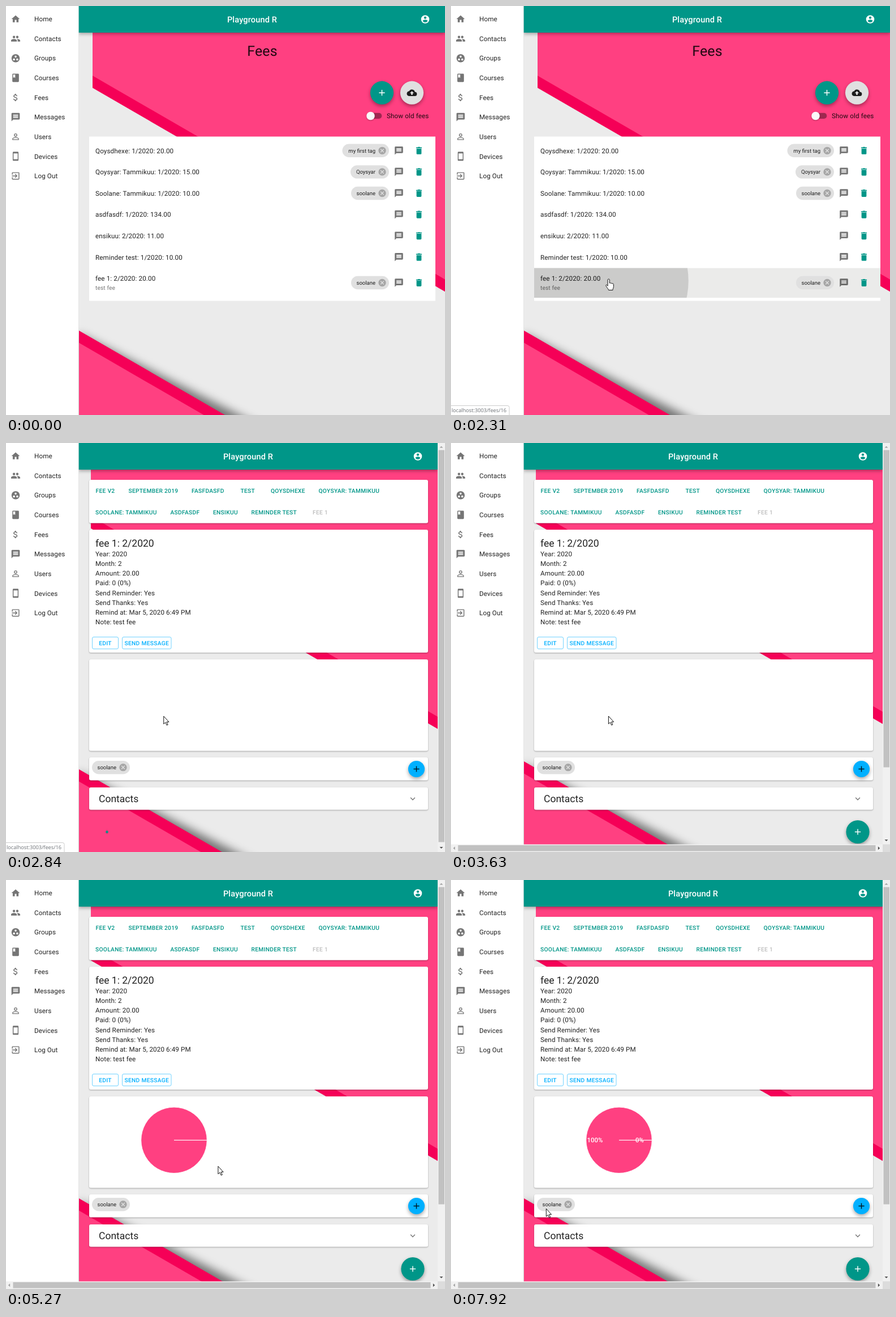
These frames come from a looping animation (776x722 px, 7.99 s). An HTML page:

```html
<!DOCTYPE html>
<html lang="en">
<head>
<meta charset="utf-8">
<title>Fees</title>
<style>
html, body { margin: 0; width: 100%; height: 100%; overflow: hidden; background: #ebebeb; }
svg { display: block; width: 100vw; height: 100vh; }
text { font-family: Roboto, "Liberation Sans", sans-serif; white-space: pre; text-rendering: geometricPrecision; }
.card { filter: drop-shadow(0 1px 1px rgba(0,0,0,.3)); }
.bar { filter: drop-shadow(0 2px 3px rgba(0,0,0,.35)); }
.fab { filter: drop-shadow(0 3px 3px rgba(0,0,0,.35)); }
.shade { filter: blur(8px); }
</style>
</head>
<body>
<svg id="stage" viewBox="0 0 776 722" xmlns="http://www.w3.org/2000/svg"></svg>
<script>
const TEAL = '#009688', PINK = '#ff4081', DEEP = '#f50057', BLUE = '#00b0ff';
const INK = 'rgba(0,0,0,.87)', GREY = 'rgba(0,0,0,.54)', DIM = 'rgba(0,0,0,.26)';
const BODY = 11.68, SMALL = 10.22, HEAD = 17.52;
const LOOP = 7990, SLOPE = Math.tan(Math.PI / 6);

// Icons on a 24 unit grid
const ICONS = {
  home: 'M10 20v-6h4v6h5v-8h3L12 3 2 12h3v8z',
  people: 'M13 8a3 3 0 1 0 6 0a3 3 0 1 0-6 0zM5 8a3 3 0 1 0 6 0a3 3 0 1 0-6 0zM8 13c-2.3 0-7 1.2-7 3.5V19h14v-2.5c0-2.3-4.7-3.5-7-3.5zm8 0l-1 .05c1.2.8 2 2 2 3.45V19h6v-2.5c0-2.3-4.7-3.5-7-3.5z',
  group: 'M2 12a10 10 0 1 0 20 0a10 10 0 1 0-20 0zM5.5 15a2.5 2.5 0 1 1 5 0a2.5 2.5 0 1 1-5 0zM9.5 8a2.5 2.5 0 1 1 5 0a2.5 2.5 0 1 1-5 0zM13.5 15a2.5 2.5 0 1 1 5 0a2.5 2.5 0 1 1-5 0z',
  book: 'M18 2H6a2 2 0 0 0-2 2v16a2 2 0 0 0 2 2h12a2 2 0 0 0 2-2V4a2 2 0 0 0-2-2zM6 4h5v8l-2.5-1.5L6 12z',
  money: 'M11.8 10.9c-2.27-.59-3-1.2-3-2.15 0-1.09 1-1.85 2.7-1.85 1.78 0 2.44.85 2.5 2.1h2.2c-.07-1.72-1.1-3.3-3.2-3.8V3h-3v2.16c-1.94.42-3.5 1.68-3.5 3.6 0 2.3 1.9 3.47 4.7 4.14 2.5.6 3 1.48 3 2.4 0 .7-.5 1.8-2.7 1.8-2.06 0-2.87-.92-2.98-2.1h-2.2c.12 2.2 1.76 3.4 3.68 3.83V21h3v-2.15c1.95-.37 3.5-1.5 3.5-3.55 0-2.84-2.43-3.8-4.7-4.4z',
  message: 'M20 2H4a2 2 0 0 0-2 2V22l4-4h14a2 2 0 0 0 2-2V4a2 2 0 0 0-2-2zm-2 12H6v-2h12zm0-3H6V9h12zm0-3H6V6h12z',
  person: 'M8 8a4 4 0 1 0 8 0a4 4 0 1 0-8 0zM9.9 8a2.1 2.1 0 1 1 4.2 0a2.1 2.1 0 1 1-4.2 0zM12 13c-2.7 0-8 1.3-8 4v3h16v-3c0-2.7-5.3-4-8-4zm6.1 5.1H5.9V17c0-.64 3.1-2.1 6.1-2.1s6.1 1.46 6.1 2.1z',
  phone: 'M17 1H7a2 2 0 0 0-2 2v18a2 2 0 0 0 2 2h10a2 2 0 0 0 2-2V3a2 2 0 0 0-2-2zm0 18H7V5h10z',
  exit: 'M10.1 15.6L11.5 17l5-5-5-5-1.4 1.4 2.6 2.6H3v2h9.7zM19 3H5a2 2 0 0 0-2 2v4h2V5h14v14H5v-4H3v4a2 2 0 0 0 2 2h14a2 2 0 0 0 2-2V5a2 2 0 0 0-2-2z',
  account: 'M2 12a10 10 0 1 0 20 0a10 10 0 1 0-20 0zM9 8a3 3 0 1 1 6 0a3 3 0 1 1-6 0zM12 19.2c-2.5 0-4.7-1.3-6-3.2 0-2 4-3.1 6-3.1s6 1.1 6 3.1c-1.3 1.9-3.5 3.2-6 3.2z',
  add: 'M19 13h-6v6h-2v-6H5v-2h6V5h2v6h6z',
  upload: 'M19.35 10A7.5 7.5 0 0 0 5.35 8A6 6 0 0 0 6 20h13a5 5 0 0 0 .35-10zM14 13v4h-4v-4H7l5-5 5 5z',
  trash: 'M6 19a2 2 0 0 0 2 2h8a2 2 0 0 0 2-2V7H6zM19 4h-3.5l-1-1h-5l-1 1H5v2h14z',
  cancel: 'M2 12a10 10 0 1 0 20 0a10 10 0 1 0-20 0zM17 15.6L15.6 17 12 13.4 8.4 17 7 15.6 10.6 12 7 8.4 8.4 7 12 10.6 15.6 7 17 8.4 13.4 12z',
  more: 'M16.6 8.6L12 13.2 7.4 8.6 6 10l6 6 6-6z'
};

const icon = (name, x, y, fill = GREY, size = 17.5) =>
  `<path d="${ICONS[name]}" fill="${fill}" fill-rule="evenodd" transform="translate(${x - size / 2} ${y - size / 2}) scale(${size / 24})"/>`;

// Text whose capitals are centred on y
const label = (s, x, y, size = BODY, o = {}) =>
  `<text x="${x}" y="${y + size * .36}" font-size="${size}" fill="${o.fill || INK}" font-weight="${o.weight || 400}" text-anchor="${o.anchor || 'start'}" letter-spacing="${o.gap ?? size * .0094}">${s}</text>`;

const rect = (x, y, w, h, fill, more = '') =>
  `<rect x="${x}" y="${y}" width="${w}" height="${h}" fill="${fill}" ${more}/>`;

const card = (y0, y1) => rect(147, y0, 599, y1 - y0, '#fff', 'rx="3" class="card"');

const fab = (x, y, r, fill, name, ink) =>
  `<circle cx="${x}" cy="${y}" r="${r}" fill="${fill}" class="fab"/>` + icon(name, x, y, ink);

const chip = (s, left, right, y) =>
  rect(left, y - 11.7, right - left, 23.4, '#e0e0e0', 'rx="11.7"') +
  label(s, right - 24, y, 9.5, { anchor: 'end', gap: 0 }) + icon('cancel', right - 12, y, DIM, 16);

const caps = (s, x, y, fill, anchor) =>
  label(s, x, y, SMALL, { fill, anchor, weight: 500, gap: .29 });

const poly = (fill, p, more = '') => `<polygon points="${p.join(' ')}" fill="${fill}" ${more}/>`;

function backdrop(id, x, topY, lowY) {
  const upper = (fill, y) => poly(fill, [x, 0, 776, 0, 776, y + (776 - x) * SLOPE, x, y]);
  const lower = (fill, y) => poly(fill, [129, y, 129 + (760 - y) / SLOPE, 760, 129, 760]);
  // The shadow is a little flatter than the edge, so it widens to the right
  const shade = poly('rgba(0,0,0,.5)', [129, lowY + 5, 489, lowY + 5 + 360 * (SLOPE - .07), 489, 790, 129, 790], 'class="shade"');
  return `<g id="${id}">` + rect(0, 0, 776, 722, '#ebebeb') +
    upper(DEEP, topY + 21.6) + upper(PINK, topY) +
    shade + lower(DEEP, lowY) + lower(PINK, lowY + 21.6) + '</g>';
}

const header = (right, mid) => rect(128, 0, right - 128, 47, TEAL, 'class="bar"') +
  label('Playground R', mid, 23.5, 14.6, { fill: '#fff', weight: 500, anchor: 'middle' }) +
  icon('account', right - 35, 23.5, '#fff');

const MENU = [['home', 'Home'], ['people', 'Contacts'], ['group', 'Groups'], ['book', 'Courses'],
  ['money', 'Fees'], ['message', 'Messages'], ['person', 'Users'], ['phone', 'Devices'], ['exit', 'Log Out']];

const sidebar = () => rect(0, 0, 128.6, 722, '#fff') + rect(128, 0, .6, 722, 'rgba(0,0,0,.12)') +
  MENU.map(([i, s], n) => icon(i, 17, 23 + n * 34.62) + label(s, 50, 23 + n * 34.62)).join('');

// Fee rows: text, chip, chip left edge
const FEES = [['Qoysdhexe: 1/2020: 20.00', 'my first tag', 594.5], ['Qoysyar: Tammikuu: 1/2020: 15.00', 'Qoysyar', 609],
  ['Soolane: Tammikuu: 1/2020: 10.00', 'soolane', 610], ['asdfasdf: 1/2020: 134.00'], ['ensikuu: 2/2020: 11.00'],
  ['Reminder test: 1/2020: 10.00'], ['fee 1: 2/2020: 20.00', 'soolane', 610]];
const LAST = FEES.length - 1;
const rowTop = n => n > LAST ? 515 : 237 + n * 37.6;

function feeRow([s, tag, left], n) {
  const last = n === LAST, y = last ? 488.5 : 255.3 + n * 37.6;
  let out = rect(147, rowTop(n), 612, rowTop(n + 1) - rowTop(n), '#ebebea', `id="row${n}" opacity="0"`);
  if (last) out += '<g clip-path="url(#rowClip)"><circle id="ripple" cx="279" cy="485" r="0"/></g>';
  out += label(s, 158, last ? 481 : y);
  if (last) out += label('test fee', 158, 497, SMALL, { fill: GREY });
  if (tag) out += chip(tag, left, 677, y);
  return out + icon('message', 694.5, y) + icon('trash', 730, y, TEAL);
}

const listPage = () => '<g id="list">' + backdrop('bgList', 153, 123, 573) +
  label('Fees', 453, 79.5, 24.9, { anchor: 'middle' }) +
  fab(664.5, 153.2, 20.6, TEAL, 'add', '#fff') + fab(717.5, 153.2, 20.6, '#e0e0e0', 'upload', INK) +
  rect(639.5, 188.8, 24.8, 10.2, '#9e2850', 'rx="5.1"') +
  '<circle cx="644.5" cy="194" r="7.3" fill="#fafafa" class="card"/>' + label('Show old fees', 673, 193.5) +
  rect(147, 230.5, 612, 290, '#fff') + FEES.map(feeRow).join('') + header(776, 435) + '</g>';

const TABS = [['FEE V2', 158.5], ['SEPTEMBER 2019', 216.5], ['FASFDASFD', 328], ['TEST', 414.5], ['QOYSDHEXE', 468],
  ['QOYSYAR: TAMMIKUU', 552.5], ['SOOLANE: TAMMIKUU', 158], ['ASDFASDF', 290.5], ['ENSIKUU', 366],
  ['REMINDER TEST', 433.5], ['FEE 1', 542]];
const FACTS = ['Year: 2020', 'Month: 2', 'Amount: 20.00', 'Paid: 0 (0%)', 'Send Reminder: Yes', 'Send Thanks: Yes',
  'Remind at: Mar 5, 2020 6:49 PM', 'Note: test fee'];

const outlined = (s, x, w) =>
  rect(x, 342.5, w, 21, 'none', `rx="2.5" stroke="${BLUE}" stroke-opacity=".55"`) + caps(s, x + w / 2, 353, BLUE, 'middle');

const arrow = (x, y, turn, fill) =>
  `<path d="M-3 1.6L0-1.6L3 1.6z" fill="${fill}" transform="translate(${x} ${y}) rotate(${turn})"/>`;

const scrollers = () => rect(763, 0, 13, 722, '#f1f1f1') + rect(764.5, 12.5, 10.5, 692, '#c1c1c1', 'id="thumb"') +
  arrow(769.5, 7, 0, '#a3a3a3') + `<g id="down">${arrow(769.5, 0, 180, '#505050')}</g>` +
  '<g id="across">' + rect(0, 708.5, 776, 13.5, '#f1f1f1') + rect(12.5, 710, 738, 10.5, '#c1c1c1') +
  arrow(5.5, 715.3, -90, '#a3a3a3') + arrow(756.5, 715.3, 90, '#505050') + rect(763, 708.5, 13, 13.5, '#dcdcdc') + '</g>';

const detailPage = () => '<g id="detail">' + backdrop('bgFirst', 150, 129.2, 576) + backdrop('bgFinal', 150, 120.4, 562) +
  card(65, 141.5) + TABS.map(([s, x], n) => caps(s, x, n < 6 ? 84 : 122, n < 10 ? TEAL : DIM)).join('') +
  card(153, 370) + label('fee 1: 2/2020', 158, 176.5, HEAD, { gap: 0 }) +
  FACTS.map((s, n) => label(s, 158, 196 + n * 17.08)).join('') +
  outlined('EDIT', 152.5, 46) + outlined('SEND MESSAGE', 205.5, 86.5) +
  card(382, 543.5) + `<path id="pie" fill="${PINK}" stroke="#fff" stroke-width=".8"/>` +
  '<g id="shares">' + [['100%', 254.5], ['0%', 333.5]].map(([s, x]) =>
    label(s, x, 459.3, 11.4, { fill: '#fff', weight: 500, anchor: 'middle', gap: 0 })).join('') + '</g>' +
  card(555, 595.5) + chip('soolane', 152, 219, 572.7) + fab(725.5, 575.5, 14.6, BLUE, 'add', INK) +
  card(608, 647.5) + label('Contacts', 164, 628, HEAD, { gap: 0 }) + icon('more', 719, 628) +
  `<g id="addFab">${fab(0, 0, 20.6, TEAL, 'add', '#fff')}</g>` + header(763, 428) + '</g>';

const status = () => '<g id="status"><path d="M-1 705.5H100a3 3 0 0 1 3 3V723H-1z" fill="#fff" stroke="#ccc"/>' +
  '<text id="link" x="1" y="717" font-size="9.2" fill="#6b6f74" style="font-family:\'Open Sans\',sans-serif"></text></g>';

const cursors = () => '<g id="cursor" fill="#fff" stroke="#111" stroke-linejoin="round">' +
  '<path id="point" d="M.3.3V14L3.4 11.2L5.6 16.2L7.7 15.3L5.5 10.4H9.5z"/>' +
  '<path id="hand" d="M-1.7 1.6a1.6 1.6 0 0 1 3.2 0V7.2a1.5 1.5 0 0 1 2.4.5a1.5 1.5 0 0 1 2.4.6a1.4 1.4 0 0 1 2.3 1.2V13.5c0 2-1.4 3-1.4 6H-.2c-.4-2.5-4.3-5.8-4.8-8c0-1.5 1.6-1.6 2.2-.7L-1.7 12.3z"/></g>';

document.getElementById('stage').innerHTML =
  `<defs><clipPath id="rowClip">${rect(147, rowTop(LAST), 612, 52.4, '#000')}</clipPath></defs>` +
  listPage() + detailPage() + sidebar() + `<g id="bars">${scrollers()}</g>` + status() + cursors();

const el = id => document.getElementById(id);
const set = (id, attrs) => { for (const k in attrs) el(id).setAttribute(k, attrs[k]); };
const show = (id, on) => { el(id).style.display = on ? '' : 'none'; };
const clamp = v => Math.max(0, Math.min(1, v));

// CSS-style cubic bezier easing, solved by bisection
function bezier(x1, y1, x2, y2) {
  const at = (a, b, s) => 3 * (1 - s) ** 2 * s * a + 3 * (1 - s) * s * s * b + s ** 3;
  return x => {
    if (x <= 0 || x >= 1) return clamp(x);
    let lo = 0, hi = 1;
    for (let i = 0; i < 24; i++) {
      const m = (lo + hi) / 2;
      if (at(x1, x2, m) < x) lo = m; else hi = m;
    }
    return at(y1, y2, lo);
  };
}
const standard = bezier(.4, 0, .2, 1), ease = bezier(.25, .1, .25, 1);

// Pointer path: down to the last row, clockwise around the pie, then down to the chip. Time, x, y
const PATH = [[480, 480, 0], [650, 455, 150], [850, 425, 270], [1050, 395, 340], [1250, 365, 385], [1305, 352, 426],
  [1460, 330, 462.7], [1540, 326, 464], [1910, 279, 482], [3630, 278, 482], [3900, 310, 445], [4260, 375, 408],
  [4390, 430, 410], [4550, 490, 422], [4720, 507, 445], [5000, 495, 485], [5170, 465, 500], [5270, 375, 505],
  [5400, 325, 510], [5600, 275, 495], [5850, 262, 455], [6050, 285, 428], [6200, 340, 423], [6400, 440, 440],
  [6600, 497, 480], [7000, 497, 480], [7230, 588, 525], [7400, 430, 585], [7530, 263, 584], [7690, 263, 584], [7920, 168, 580]];

function pointer(t) {
  const i = PATH.findIndex(p => p[0] > t);
  if (i < 0) return PATH[PATH.length - 1].slice(1);
  if (i === 0) return PATH[0].slice(1);
  const [a, b] = [PATH[i - 1], PATH[i]], f = (t - a[0]) / (b[0] - a[0]);
  return [a[1] + (b[1] - a[1]) * f, a[2] + (b[2] - a[2]) * f];
}

function rowAt(t) {
  const y = pointer(t)[1];
  return FEES.findIndex((_, n) => y >= rowTop(n) && y < rowTop(n + 1));
}

// Hover fades over 150 ms: the share of that window spent on the row
function hover(n, t) {
  let hits = 0;
  for (let i = 0; i < 15; i++) if (rowAt(t - i * 10) === n) hits++;
  return hits / 15;
}

const PRESS = 2161, RELEASE = 2310, OPEN = 2800, SETTLE = 2920;

function drawRipple(t) {
  const grow = standard((t - PRESS) / 550), fade = standard((t - RELEASE) / 550);
  set('ripple', { r: 479 * grow, opacity: .87 * (.1 + .2 * grow) * (1 - fade) });
}

function drawPie(t) {
  const a = Math.min(359.9, 360 * ease((t - 3794) / 1500)), rad = a * Math.PI / 180;
  show('pie', a > 0);
  set('pie', { d: `M297 459.3H355.2A58.2 58.2 0 ${a > 180 ? 1 : 0} 0 ${297 + 58.2 * Math.cos(rad)} ${459.3 - 58.2 * Math.sin(rad)}z` });
  show('shares', t >= 5340);
}

function draw(t) {
  const open = t >= OPEN, settled = t >= SETTLE, row = rowAt(t), [x, y] = pointer(t);
  show('list', !open);
  show('detail', open);
  show('bars', open);

  if (!open) {
    FEES.forEach((_, n) => set('row' + n, { opacity: hover(n, t) }));
    drawRipple(t);
  } else {
    show('bgFirst', !settled);
    show('bgFinal', settled);
    show('across', settled);
    set('thumb', { height: settled ? 560 : 692 });
    set('down', { transform: `translate(0 ${settled ? 701.5 : 714.5})` });
    const grow = standard((t - OPEN) / 225);
    set('addFab', { transform: `translate(${settled ? 719 : 178.5} 686.5) scale(${grow})` });
    drawPie(t);
  }

  // The link bubble fades shortly after the page opens
  const linger = 1 - clamp((t - OPEN - 250) / 180);
  show('status', linger > 0 && row >= 0);
  set('status', { opacity: linger });
  el('link').textContent = 'localhost:3003/fees/' + (10 + row);

  show('cursor', t >= 480);
  show('hand', !open && row >= 0);
  show('point', open || row < 0);
  set('cursor', { transform: `translate(${x} ${y})` });
}

function tick() {
  draw(performance.now() % LOOP);
  requestAnimationFrame(tick);
}
tick();
</script>
</body>
</html>
```
